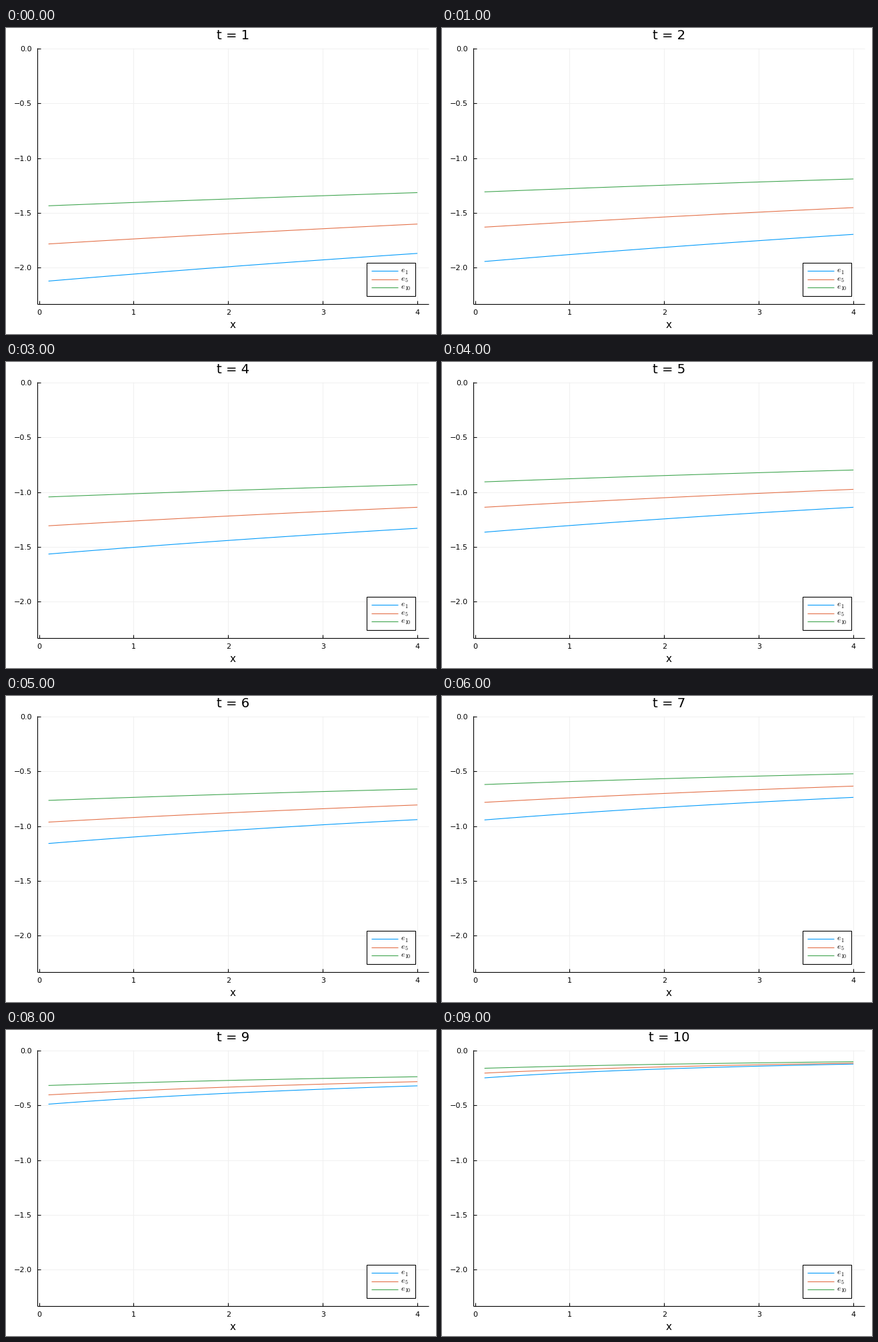
A matplotlib script that plays this animation: 645x460 px, repeating every 10000 ms.

```python
import numpy as np
import matplotlib.pyplot as plt
from matplotlib.animation import FuncAnimation
from matplotlib.patches import Rectangle

W, H, DPI = 645, 460, 80
PT = 72 / DPI  # points per pixel
X0, XU = 49.5, 141.9
Y0, YU = 31.0, 164.6
LEFT, RIGHT, TOP, BOTTOM = 47, 634, 30, 415
STEPS = 10
COLORS = {1: "#009AFA", 5: "#E36F47", 10: "#3EA44E"}

plt.rcParams["font.family"] = "DejaVu Sans"
plt.rcParams["mathtext.fontset"] = "cm"


def px(x):
    return X0 + XU * x


def py(y):
    return Y0 - YU * y


def curve(k, n, x):
    """Value of e_k at x with n steps left."""
    decay = 0.9629 + 0.0011 * k
    start = 0.249 * np.exp(-0.0483 * (k - 1)) * (1 - decay**n) / (1 - decay)
    log_n = np.log(n)
    rise = (0.126 + 0.062 * log_n - 0.003 * log_n**2) * np.exp(-0.0825 * (k - 1))
    c = 0.8 + 3 * n + 0.2 * k
    return rise * (x - 0.1) / 3.9 * (c + 4) / (c + x) - start


fig = plt.figure(figsize=(W / DPI, H / DPI), dpi=DPI, facecolor="white")
ax = fig.add_axes([0, 0, 1, 1])
ax.set_xlim(0, W)
ax.set_ylim(H, 0)
ax.axis("off")


def line(xs, ys, color="black", width=1.1, z=2):
    return ax.plot(xs, ys, color=color, lw=width * PT, zorder=z,
                   solid_capstyle="butt")[0]


def label(x, y, s, size, ha="center"):
    return ax.text(x, y, s, fontsize=size * PT, ha=ha, va="baseline", zorder=6)


for i in range(5):
    x, y = px(i), py(-0.5 * i)
    if i:
        line([x, x], [TOP, BOTTOM], "#F0F0F0", 1, 1)
    line([LEFT, RIGHT], [y, y], "#F0F0F0", 1, 1)
    line([x, x], [BOTTOM, BOTTOM - 5])
    line([LEFT, LEFT + 5], [y, y])
    label(x, 431, str(i), 11.1)
    sign = "\u2212" if i else ""
    label(39, y + 4, f"{sign}{0.5 * i:.1f}", 11.1, "right")

line([LEFT, LEFT], [TOP, BOTTOM])
line([LEFT, RIGHT], [BOTTOM, BOTTOM])
label(340.5, 451, "x", 15.3)
title = label(340.5, 17, "", 19.6)

ax.add_patch(Rectangle((541.3, 352.7), 73, 50, fc="white", ec="black",
                       lw=1.1 * PT, zorder=4))

grid = np.linspace(0.1, 4, 40)
plots = {}
for row, (k, color) in enumerate(COLORS.items()):
    y = 365 + 12.5 * row
    line([547.5, 587.5], [y, y], color, 1.1, 5)
    label(592.5, y + 2, "$e$", 11.5, "left")
    label(598, y + 4.5, f"${k}$", 8, "left")
    plots[k] = line([], [], color, 1.1, 3)


def update(frame):
    title.set_text(f"t = {frame + 1}")
    for k, plot in plots.items():
        plot.set_data(px(grid), py(curve(k, STEPS - frame, grid)))
    return [title, *plots.values()]


anim = FuncAnimation(fig, update, frames=STEPS, interval=1000, repeat=True,
                     repeat_delay=0, blit=False)
plt.show()
```
